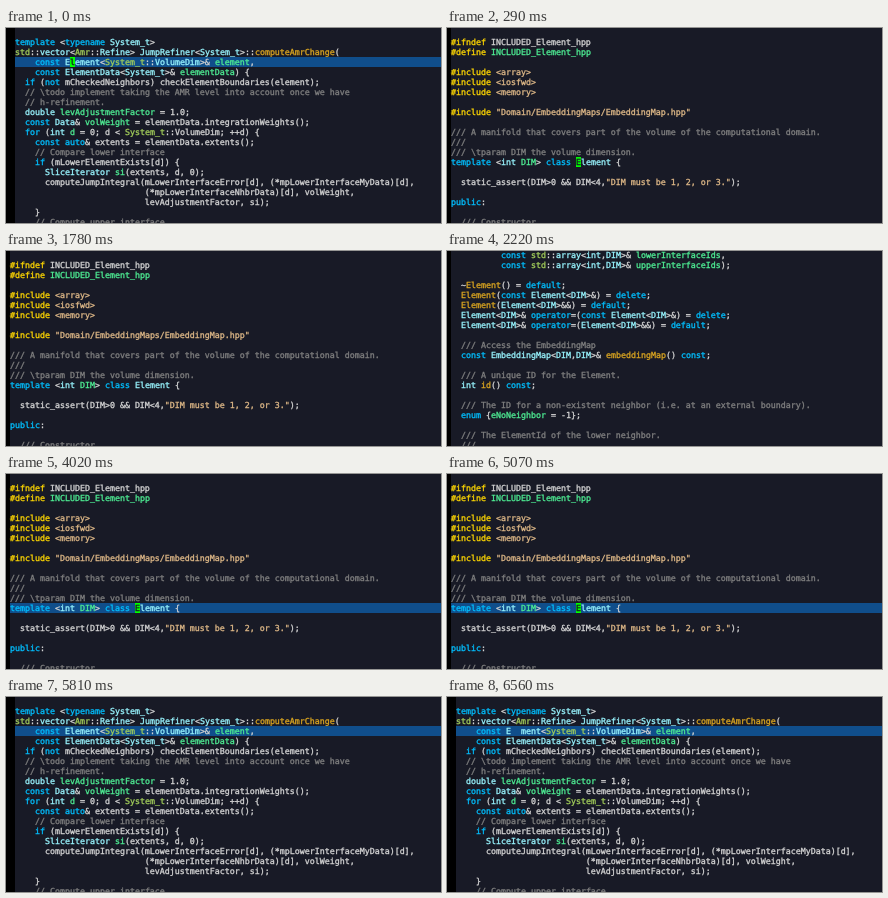
An HTML page for the animation above (6.66 s loop, 435 by 195 pixels).

```html
<!DOCTYPE html>
<html lang="en">
<head>
<meta charset="utf-8">
<title>Jump to definition</title>
<style>
  html, body { margin: 0; width: 100%; height: 100%; overflow: hidden; background: #000; }
  #stage { position: relative; width: 435px; height: 195px; overflow: hidden; background: #000; }
  .view { position: absolute; top: 0; right: 0; bottom: 0; background: #181a26; }
  .line, .bar, .cursor, .gap { position: absolute; height: 10px; }
  .line, .cursor {
    font: 8.305px/10px "DejaVu Sans Mono", monospace;
    text-rendering: geometricPrecision;
    font-variant-ligatures: none;
    -webkit-text-stroke: 0.32px;
    white-space: pre;
    color: #d4d4d4;
  }
  .bar { left: 0; right: 0; background: #104e8b; }
  .cursor { width: 5px; background: #00ff00; color: #181a26; }
  .gap { width: 10px; background: #104e8b; }
  .comment { color: #7f7f7f; }
  .string { color: #deb887; }
  .pre { color: #ffd700; }
  .key { color: #00bfff; }
  .scope { color: #a2cd5a; }
  .func { color: #daa520; }
  .type { color: #98f5ff; }
  .name { color: #4eee94; }
</style>
</head>
<body>
<div id="stage"></div>
<script>
const CELL = 5, ROW = 10, TOP = -1, LOOP = 6660;

const views = {
  caller: { left: 9, row: 3, col: 11, text: String.raw`
template <typename System_t>
std::vector<Amr::Refine> JumpRefiner<System_t>::computeAmrChange(
    const Element<System_t::VolumeDim>& element,
    const ElementData<System_t>& elementData) {
  if (not mCheckedNeighbors) checkElementBoundaries(element);
  // \todo implement taking the AMR level into account once we have
  // h-refinement.
  double levAdjustmentFactor = 1.0;
  const Data& volWeight = elementData.integrationWeights();
  for (int d = 0; d < System_t::VolumeDim; ++d) {
    const auto& extents = elementData.extents();
    // Compare lower interface
    if (mLowerElementExists[d]) {
      SliceIterator si(extents, d, 0);
      computeJumpIntegral(mLowerInterfaceError[d], (*mpLowerInterfaceMyData)[d],
                          (*mpLowerInterfaceNhbrData)[d], volWeight,
                          levAdjustmentFactor, si);
    }
    // Compute upper interface` },
  header: { left: 4, row: 13, col: 25, text: String.raw`
#ifndef INCLUDED_Element_hpp
#define INCLUDED_Element_hpp

#include <array>
#include <iosfwd>
#include <memory>

#include "Domain/EmbeddingMaps/EmbeddingMap.hpp"

/// A manifold that covers part of the volume of the computational domain.
///
/// \tparam DIM the volume dimension.
template <int DIM> class Element {

  static_assert(DIM>0 && DIM<4,"DIM must be 1, 2, or 3.");

public:

  /// Constructor` },
  members: { left: 4, text: String.raw`          const std::array<int,DIM>& lowerInterfaceIds,
          const std::array<int,DIM>& upperInterfaceIds);

  ~Element() = default;
  Element(const Element<DIM>&) = delete;
  Element(Element<DIM>&&) = default;
  Element<DIM>& operator=(const Element<DIM>&) = delete;
  Element<DIM>& operator=(Element<DIM>&&) = default;

  /// Access the EmbeddingMap
  const EmbeddingMap<DIM,DIM>& embeddingMap() const;

  /// A unique ID for the Element.
  int id() const;

  /// The ID for a non-existent neighbor (i.e. at an external boundary).
  enum {eNoNeighbor = -1};

  /// The ElementId of the lower neighbor.
  ///` }
};

// start, view, cursor, highlighted line, blanked cells
const steps = [
  [0, "caller", 1, 1, 0],
  [290, "header", 1, 0, 0],
  [890, "header", 0, 0, 0],
  [1330, "header", 1, 0, 0],
  [1780, "header", 0, 0, 0],
  [2220, "members", 0, 0, 0],
  [4020, "header", 1, 1, 0],
  [4470, "header", 0, 1, 0],
  [5070, "header", 1, 1, 0],
  [5360, "caller", 1, 1, 0],
  [5810, "caller", 0, 1, 0],
  [6410, "caller", 1, 1, 0],
  [6560, "caller", 0, 1, 1]
];

const syntax = new RegExp([
  String.raw`(?<comment>\/\/.*)`,
  String.raw`(?<string>"[^"]*"|(?<=include )<\w+>)`,
  String.raw`(?<pre>#\w+)`,
  String.raw`(?<key>\b(?:template|typename|const|class|public|if|not|for|auto|default|delete|operator|enum)\b)`,
  String.raw`(?<scope>\b\w+(?=::))`,
  String.raw`(?<func>\b(?:computeAmrChange|Element|embeddingMap|id)(?=\())`,
  String.raw`(?<name>(?<=>& |Data& |int |double |define )\w+|\bsi(?=\()|eNoNeighbor)`,
  String.raw`(?<type>\b(?:vector|array|Refine|JumpRefiner|Element|ElementData|EmbeddingMap|System_t|SliceIterator|Data|int|double)\b|VolumeDim(?=>)|(?<=[<,])DIM)`
].join("|"), "g");

function add(parent, cls, text = "") {
  const el = document.createElement("div");
  el.className = cls;
  el.textContent = text;
  return parent.appendChild(el);
}

function place(el, row, col = 0) {
  el.style.top = TOP + row * ROW + "px";
  el.style.left = col * CELL + "px";
  return el;
}

function paint(line, code) {
  let end = 0;
  for (const m of code.matchAll(syntax)) {
    line.append(code.slice(end, m.index));
    const span = document.createElement("span");
    span.className = Object.keys(m.groups).find(k => m.groups[k] !== undefined);
    span.textContent = m[0];
    line.append(span);
    end = m.index + m[0].length;
  }
  line.append(code.slice(end));
}

const stage = document.getElementById("stage");
for (const v of Object.values(views)) {
  v.el = add(stage, "view");
  v.el.style.left = v.left + "px";
  const lines = v.text.split("\n");
  if (v.row) v.bar = place(add(v.el, "bar"), v.row);
  lines.forEach((code, row) => paint(place(add(v.el, "line"), row), code));
  if (v.row) {
    v.cursor = place(add(v.el, "cursor", lines[v.row][v.col]), v.row, v.col);
    v.gap = place(add(v.el, "gap"), v.row, v.col);
  }
}

const show = (el, on) => { el.style.visibility = on ? "visible" : "hidden"; };

function draw() {
  const t = performance.now() % LOOP;
  const [, name, cursor, bar, gap] = steps.findLast(s => s[0] <= t);
  for (const [key, v] of Object.entries(views)) {
    const on = key === name;
    show(v.el, on);
    if (!v.row) continue;
    show(v.cursor, on && cursor);
    show(v.bar, on && bar);
    show(v.gap, on && gap);
  }
  requestAnimationFrame(draw);
}
draw();
</script>
</body>
</html>
```
